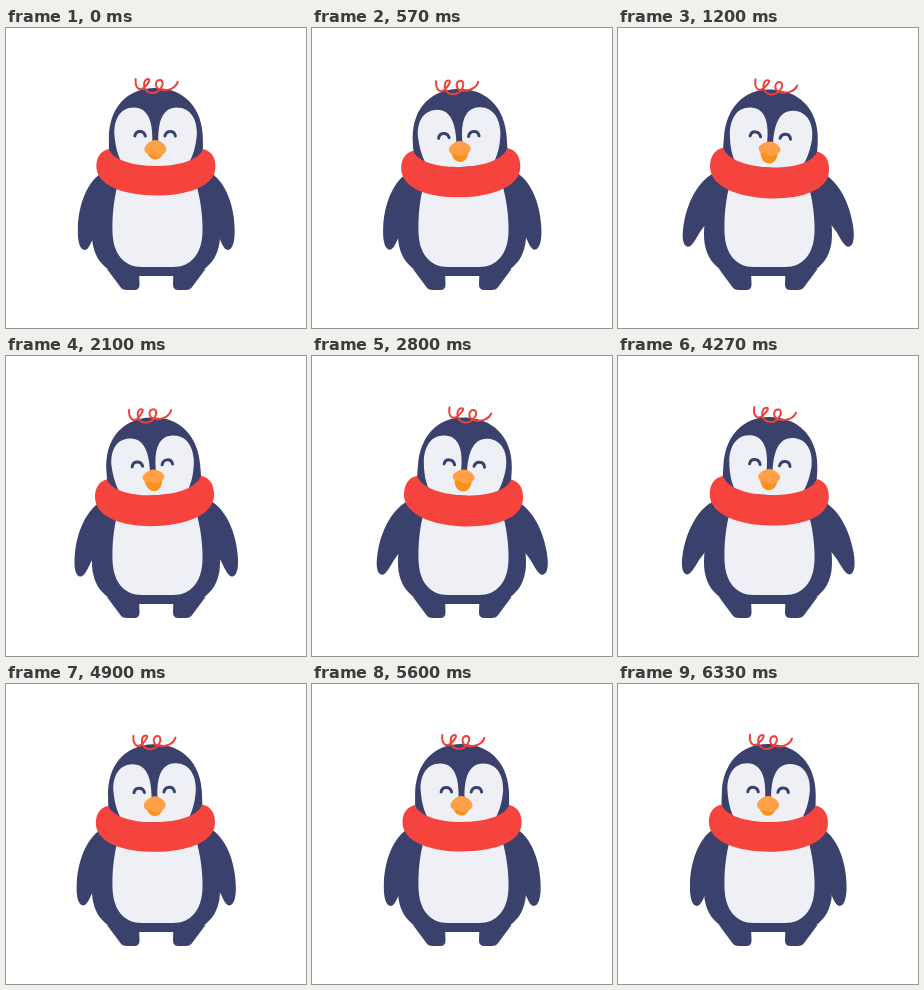
Recreate the animation shown at these times as an HTML page. Size 300x300 px, loop 6.41 s.

```html
<!DOCTYPE html>
<html lang="en">
<head>
<meta charset="utf-8">
<title>Penguin</title>
<style>
  html, body { margin: 0; width: 100%; height: 100%; overflow: hidden; background: #fff; }
  svg { display: block; width: 100vw; height: 100vh; }
  .navy { fill: #3a416d; }
  .pale { fill: #eff0f6; }
  .red { fill: #f4443d; }
  .line { fill: none; stroke-linecap: round; stroke-linejoin: round; }
  .eye { stroke: #3a416d; stroke-width: 3; }
  .curl { stroke: #ee4038; stroke-width: 2; }
</style>
</head>
<body>
<svg viewBox="0 0 300 300">
  <defs>
    <path id="wing" d="M102 142C83 148 72.500 175 72 200C71.500 213 74 222 79 222C83 222 86 213 89 206L104 178Z"/>
    <path id="foot" d="M101 241L114 258.500Q116 262 121 262H129Q134 262 133.500 255L133 244Z"/>
  </defs>
  <g class="navy">
    <use id="left" href="#wing"/>
    <g transform="matrix(-1 0 0 1 300.500 0)"><use id="right" href="#wing"/></g>
    <use href="#foot"/>
    <use href="#foot" transform="matrix(-1 0 0 1 300.500 0)"/>
    <path d="M104 140C92 155 86 184 86 207C86 226 95 239 109 245Q116 248 127 248H173Q184 248 191 245C205 239 214 226 214 207C214 184 208 155 196 140Z"/>
  </g>
  <path class="pale" d="M114 150C108 166 106 187 106.500 204C107 226 118 239 136 239H167C185 239 196 226 196.500 204C197 187 194 166 188 150Z"/>
  <g id="head">
    <path class="navy" d="M103 145V111C103 80 121 60 149.500 60C178 60 197 80 197 111V145Z"/>
    <path class="pale" d="M146.500 114C147 95 143 79.500 128 79.500C114 79.500 108 92 108.500 106C109.500 119 112 129 118 138H181C187 129 190 119 191 106C191.500 92 185 79.500 171 79.500C156 79.500 152 95 152.500 114Z"/>
    <path class="line eye" d="M129 108C130 102 138 102 139.500 108M159 108C160.500 102 168.500 102 169.500 108"/>
    <path id="jaw" fill="#f7921c" d="M140.500 119C140.500 126 144 131.500 149.500 131.500C155 131.500 158 126 158 119Z"/>
    <path id="beak" fill="#ffa046" d="M149.500 112C145 112 138.500 117 138.500 121C138.500 124.500 141 126 144 126C147 126 147 127 150 128.500C155 128.500 160.500 125 160.500 121C160.500 117 154 112 149.500 112Z"/>
    <path class="line curl" d="M130 51C129 60 134 64 139 59C144 54 145 51 142 51C137 51 136 64 146 65C155 65 160 54 155 52C149 51 148 61 156 62C163 63 170 60 172 54"/>
  </g>
  <path id="scarf" class="red" d="M103 121C94 123 90 130 90.500 140C92 159 121 167.500 150 167.500C180 167.500 208.500 159 209.500 140C210 130 206 123 197 121C193 132 173 138 149.500 138C127 138 107 132 103 121Z"/>
</svg>
<script>
const LOOP = 6410, STEP = 80, SWAY = 1600;
const [left, right, head, jaw, beak, scarf] =
  ['left', 'right', 'head', 'jaw', 'beak', 'scarf'].map(id => document.getElementById(id));
const move = (el, value) => el.setAttribute('transform', value);

// steps of 80 ms, shown on the next tick of a 30 per second clock
function heldTime(ms) {
  const tick = Math.floor((ms + 4) * .03);
  return Math.min(79, Math.floor(tick / 2.4 + 1e-6)) * STEP;
}

function pose(ms) {
  const turn = 2 * Math.PI / SWAY;
  const lean = -Math.sin((ms + 10) * turn);
  const open = lean ** 2;
  const flap = Math.cos((ms - 310) * turn) ** 4;
  const wing = `rotate(${10 * flap} 98 152)`;
  move(left, wing);
  move(right, wing);
  move(head, `translate(0 ${1.5 * open}) rotate(${4.5 * lean} 150 147)`);
  move(scarf, `rotate(${2.2 * lean} 150 180) translate(0 ${1.5 * open - 7 * open}) scale(1 ${1 + .05 * open})`);
  move(jaw, `translate(0 ${2.5 * open})`);
  move(beak, `translate(0 ${112 * .16 * open}) scale(1 ${1 - .16 * open})`);
}

const start = performance.now();
function draw(now) {
  pose(heldTime(Math.max(0, now - start) % LOOP));
  requestAnimationFrame(draw);
}
draw(start);
</script>
</body>
</html>
```
